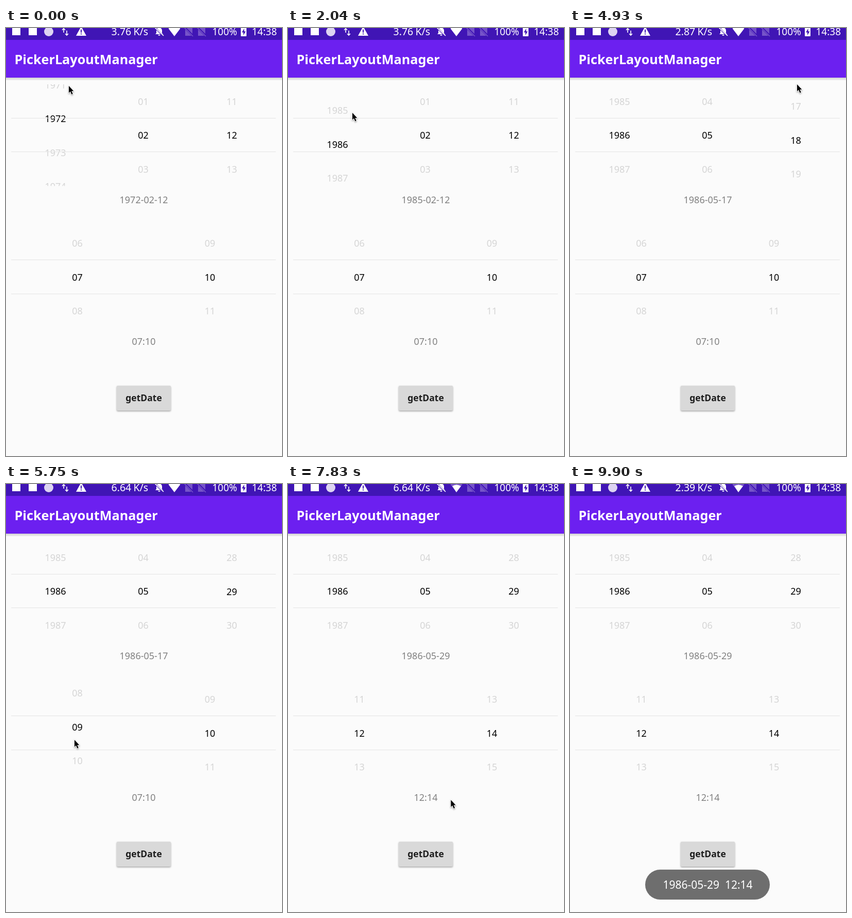
An HTML page with a canvas for the animation above (10000 ms loop, 536 px wide and 828 px high).

```html
<!DOCTYPE html>
<html lang="en">
<head>
<meta charset="utf-8">
<title>PickerLayoutManager</title>
<style>
html, body { margin: 0; width: 536px; height: 828px; overflow: hidden; background: #fbfbfb; }
canvas { display: block; }
</style>
</head>
<body>
<canvas id="stage" width="536" height="828"></canvas>
<script>
const ctx = document.getElementById('stage').getContext('2d');
const FONT = '"Noto Sans", "Open Sans", sans-serif';
const LOOP = 10000, STEP = 60, ROW = 65.5;
const DRAG_MS_PER_PX = 2.5, GLIDE_MS = 400;

const columns = {
  year: { x: 96, y: 207.5, start: 1972 },
  month: { x: 266.5, y: 207.5, start: 2 },
  day: { x: 438.5, y: 207.5, start: 12 },
  hour: { x: 138.5, y: 482, start: 7 },
  minute: { x: 396, y: 482, start: 10 },
};

// A swipe drags its column from y0 to y1, then the column coasts to its goal.
const swipe = (col, press, x, y0, y1, goal) =>
  ({ col, press, x, y0, y1, goal, release: press + (y0 - y1) * DRAG_MS_PER_PX });

const swipes = [
  swipe('year', -80, 122, 144, 112, 1979),
  swipe('year', 1090, 124, 250, 119, 1985),
  swipe('year', 1920, 125, 212, 146, 1986),
  swipe('month', 2520, 270, 260, 129, 4),
  swipe('month', 2890, 281, 268, 176, 5),
  swipe('day', 3600, 445, 260, 129, 17),
  swipe('day', 4780, 441, 165, 109, 29),
  swipe('hour', 5270, 100, 520, 389, 9),
  swipe('hour', 5670, 133, 507, 376, 12),
  swipe('minute', 6925, 382, 483, 385, 14),
  swipe('button', 7950, 286, 716, 716),
];

const clamp = v => Math.max(0, Math.min(1, v));
const mix = (a, b, p) => a + (b - a) * p;
const smooth = p => p * p * (3 - 2 * p);
const easeOut = p => 1 - (1 - p) ** 2;
const pad = n => String(n).padStart(2, '0');
const latest = (steps, t) => steps.filter(s => s[0] <= t).pop()[1];

const lastSwipe = (col, t) => swipes.filter(s => s.col === col && s.press <= t).pop();
const fingerY = (s, t) => s.y1 + Math.max(0, s.release - t) / DRAG_MS_PER_PX;
const dragEnd = s => position(s.col, s.press - 1) + (s.y0 - s.y1) / ROW;
const coastTime = s => 250 + 50 * Math.abs(s.goal - dragEnd(s));

function position(col, t) {
  const s = lastSwipe(col, t);
  if (!s) return columns[col].start;
  if (t <= s.release) return dragEnd(s) - (fingerY(s, t) - s.y1) / ROW;
  return mix(dragEnd(s), s.goal, easeOut(clamp((t - s.release) / coastTime(s))));
}

// The labels only take a value once its column has come to rest.
function settled(col, t) {
  const s = lastSwipe(col, t);
  if (!s) return pad(columns[col].start);
  return t >= s.release + coastTime(s) ? pad(s.goal) : settled(col, s.press - 1);
}

function pointerAt(t) {
  const s = swipes.filter(w => w.press <= t).pop();
  const next = swipes[swipes.indexOf(s) + 1];
  if (t <= s.release || !next) return [s.x, fingerY(s, t)];
  const leave = Math.max(s.release, next.press - GLIDE_MS);
  const p = smooth(clamp((t - leave) / (next.press - leave)));
  return [mix(s.x, next.x, p), mix(s.y1, next.y0, p)];
}

function rect(x, y, w, h, color) {
  ctx.fillStyle = color;
  ctx.fillRect(x, y, w, h);
}

function text(s, x, y, size, color, align = 'left', weight = 400) {
  ctx.font = `${weight} ${size}px ${FONT}`;
  ctx.fillStyle = color;
  ctx.textAlign = align;
  ctx.fillText(s, x, y);
}

function shape(d, color) {
  ctx.fillStyle = color;
  ctx.fill(new Path2D(d));
}

function line(d, color, width) {
  ctx.strokeStyle = color;
  ctx.lineWidth = width;
  ctx.stroke(new Path2D(d));
}

function pill(x, y, w, h, r, color) {
  ctx.fillStyle = color;
  ctx.beginPath();
  ctx.roundRect(x, y, w, h, r);
  ctx.fill();
}

function shadow(alpha) {
  ctx.shadowColor = `rgba(0,0,0,${alpha})`;
  ctx.shadowBlur = 3;
  ctx.shadowOffsetY = 1.5;
}

function picker({ x, y }, pos) {
  const near = Math.round(pos);
  ctx.save();
  ctx.beginPath();
  ctx.rect(x - 60, y - 98.5, 120, 196.5);
  ctx.clip();
  for (let n = near - 2; n <= near + 2; n++) {
    text(pad(n), x, y + 6.5 + (n - pos) * ROW, 18, n === near ? '#000' : '#d5d5d5', 'center');
  }
  ctx.restore();
}

function statusBar(t) {
  const bar = '#4015b5', faded = '#7654c9';
  rect(0, 0, 536, 23, bar);
  rect(12, -2, 16, 16, '#fff');
  rect(44, -2, 16, 16, '#fff');
  pill(74, -2, 18, 18, 9, '#ddd4f2');
  line('M112 9V1M109 4l3-3 3 3M118 5v9M115 11l3 3 3-3', '#fff', 1.6);
  shape('M146 -3L156 15H136Z', '#fff');
  line('M146 3v6M146 10.5v2', bar, 2);

  const rate = latest([[0, '3.76'], [2600, '2.87'], [5700, '6.64'], [8250, '2.39']], t);
  text(rate, 204.5, 14, 19.5, '#fff');
  text('K/s', 247.5, 14, 19.5, '#fff');

  shape('M290 12l2-2V5q0-5 5-6 6 1 6 6v5l2 2ZM295 13h5q-2.5 4-5 0Z', '#fff');
  line('M288 -2L306 16', bar, 3);
  line('M289 -1L306 15', '#fff', 1.7);

  const weak = t >= 7700;
  shape('M315.5 1Q327 -7 338.5 1L327 16Z', weak ? faded : '#fff');
  if (weak) shape('M319 4Q327 -1 336 4L327 16Z', '#fff');

  for (const x of [346, 371]) {
    shape(`M${x + 2} 3l6-6h8v18h-14Z`, faded);
    line(`M${x} -2l17 17`, bar, 4);
    line(`M${x} -1l17 17`, faded, 1.6);
  }
  text('100%', 400.5, 14, 19, '#fff');
  pill(456, -2, 11, 18, 1, '#fff');
  shape('M462.5 1L458 8.5H461V14L465.5 6.5H462.5Z', bar);
  text('14:38', 477.5, 14, 19, '#fff');
}

function appBar() {
  const shade = ctx.createLinearGradient(0, 96, 0, 102);
  shade.addColorStop(0, '#cfcfcf');
  shade.addColorStop(.4, '#e2e2e2');
  shade.addColorStop(1, '#f0f0f0');
  rect(0, 96, 536, 5, shade);
  rect(0, 23, 536, 73, '#6c20f0');
  text('PickerLayoutManager', 16.5, 69.5, 25.2, '#fff', 'left', 700);
}

function button(t) {
  const press = clamp((t - 8190) / 80) * clamp((8780 - t) / 250);
  const tone = Math.round(217 - 11 * press);
  ctx.save();
  shadow(.35);
  pill(215, 692, 105, 48, 2, `rgb(${tone},${tone},${tone})`);
  ctx.restore();
  text('getDate', 267.5, 722, 17.5, '#1d1d1d', 'center', 700);
}

function toast(t, message) {
  ctx.save();
  ctx.globalAlpha = easeOut(clamp((t - 8240) / 500));
  pill(146, 746, 242, 58, 29, '#6e6e6e');
  text(message, 267.5, 783, 21, '#fff', 'center');
  ctx.restore();
}

function pointer(t) {
  if (t >= 9090) return;
  const arrow = new Path2D('M0 0V13.5L3 10.7L5.5 16.5L7.7 15.5L5.3 10H9.3Z');
  ctx.save();
  ctx.translate(...pointerAt(t));
  shadow(.4);
  ctx.strokeStyle = '#fff';
  ctx.lineWidth = 1.6;
  ctx.stroke(arrow);
  ctx.shadowColor = 'transparent';
  ctx.fillStyle = '#000';
  ctx.fill(arrow);
  ctx.restore();
}

function draw(t) {
  rect(0, 0, 536, 828, '#fbfbfb');
  appBar();
  statusBar(t);

  for (const col in columns) picker(columns[col], position(col, t));
  for (const y of [174, 239, 448, 514]) rect(10, y, 514, 1, '#e4e4e4');

  const label = (cols, mark) => cols.map(col => settled(col, t)).join(mark);
  const date = label(['year', 'month', 'day'], '-');
  const time = label(['hour', 'minute'], ':');
  text(date, 267.5, 338.5, 18, '#808080', 'center');
  text(time, 267.5, 613, 18, '#808080', 'center');

  button(t);
  toast(t, `${date}\u00a0\u00a0${time}`);
  pointer(t);
}

const start = performance.now();
function tick() {
  const t = (performance.now() - start) % LOOP;
  draw(t - t % STEP);
  requestAnimationFrame(tick);
}
tick();
</script>
</body>
</html>
```
